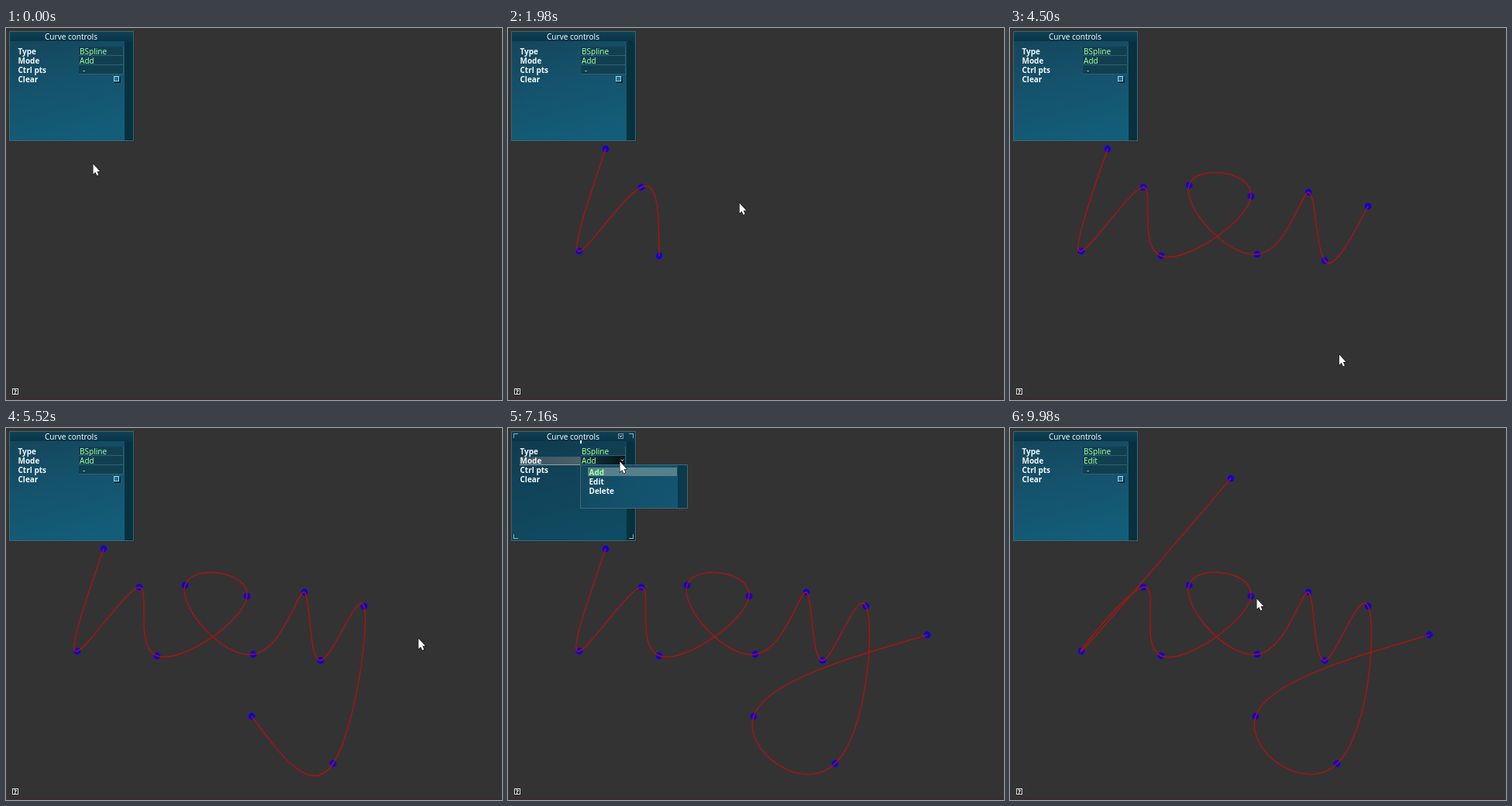
An HTML page with a canvas that plays this animation: 640x480 px, repeating every 10000 ms.

```html
<!DOCTYPE html>
<html lang="en">
<head>
<meta charset="utf-8">
<title>Curve controls</title>
<style>
html, body { margin: 0; width: 100%; height: 100%; overflow: hidden; background: #333; }
canvas { display: block; }
</style>
</head>
<body>
<canvas id="stage" width="640" height="480"></canvas>
<script>
const LOOP = 10000;
const MENU_OPEN = 7160, MENU_PICK = 7880, DRAG = 8940, DROP = 9300;
const SETTLE = 80, LINGER = 40; // pointer rest before and after a click
const ROW = 12;
const GREEN = '#a0ffa0';
const ctx = document.getElementById('stage').getContext('2d');

// Control points: x, y, click time
const points = [
  [126, 156, 300], [92, 288, 780], [172, 205.5, 1200], [195, 294, 1560],
  [311, 217, 2160], [231, 203, 2460], [319, 292, 2820], [385, 212, 3380],
  [406, 300, 3700], [462, 230, 4120], [422, 433, 4640], [317, 372, 5200],
  [541, 267, 5640]
];

// Pointer moves: start, end, x, y
const moves = points.map(([x, y, click], i) =>
  [i ? points[i - 1][2] + LINGER : 0, click - SETTLE, x, y]);
moves.push(
  [6080, 6920, 144, 43],      // to the mode field
  [MENU_OPEN, 7500, 122, 69], // down to "Edit"
  [7900, 8300, 138, 115],
  [8300, 8680, 126, 156],     // to the first point
  [DRAG, DROP, 285, 65],
  [9680, 9980, 318, 220]
);

function pointerAt(t) {
  let px = 112, py = 175;
  for (const [start, end, x, y] of moves) {
    const u = Math.min(1, Math.max(0, (t - start) / (end - start)));
    const ease = u * u * (3 - 2 * u);
    px += (x - px) * ease;
    py += (y - py) * ease;
  }
  return [px, py];
}

// Tangents of a natural cubic spline with uniform knots
function tangents(v) {
  const n = v.length - 1, b = [], d = [];
  for (let i = 0; i <= n; i++) {
    b[i] = i === 0 || i === n ? 2 : 4;
    d[i] = 3 * (v[Math.min(i + 1, n)] - v[Math.max(i - 1, 0)]);
    if (i) {
      d[i] -= d[i - 1] / b[i - 1];
      b[i] -= 1 / b[i - 1];
    }
  }
  for (let i = n; i >= 0; i--) d[i] = (d[i] - (i < n ? d[i + 1] : 0)) / b[i];
  return d;
}

function rect(x, y, w, h, fill) {
  ctx.fillStyle = fill;
  ctx.fillRect(x, y, w, h);
}

function frame(x, y, w, h, color) {
  ctx.strokeStyle = color;
  ctx.lineWidth = 1;
  ctx.strokeRect(x + .5, y + .5, w - 1, h - 1);
}

function text(s, x, y, color = '#f4f8f8', weight = 600) {
  ctx.font = `${weight} 10px "Noto Sans", "Open Sans", sans-serif`;
  ctx.fillStyle = color;
  ctx.fillText(s, x, y);
}

function gradient(x0, y0, x1, y1, ...colors) {
  const g = ctx.createLinearGradient(x0, y0, x1, y1);
  colors.forEach((c, i) => g.addColorStop(i / (colors.length - 1), c));
  return g;
}

function drawCurve(pts) {
  ctx.fillStyle = '#1400d4';
  for (const [x, y] of pts) {
    ctx.beginPath();
    ctx.arc(x, y, 4.4, 0, 7);
    ctx.fill();
  }
  if (pts.length < 2) return;
  const dx = tangents(pts.map(p => p[0])), dy = tangents(pts.map(p => p[1]));
  ctx.strokeStyle = '#a31414';
  ctx.lineWidth = 1.5;
  ctx.beginPath();
  ctx.moveTo(pts[0][0], pts[0][1]);
  for (let i = 1; i < pts.length; i++) {
    const [x0, y0] = pts[i - 1], [x1, y1] = pts[i];
    ctx.bezierCurveTo(x0 + dx[i - 1] / 3, y0 + dy[i - 1] / 3,
      x1 - dx[i] / 3, y1 - dy[i] / 3, x1, y1);
  }
  ctx.stroke();
}

function arrowButton(x, y, color) {
  frame(x, y, 7, 7, color);
  ctx.strokeStyle = '#e8f0f2';
  ctx.stroke(new Path2D(`M${x + 2} ${y + 2.5}l1.5 2l1.5 -2`));
}

function drawRow(label, value, y, active) {
  if (active) {
    rect(15, y + 1, 79, 11, gradient(15, 0, 94, 0, '#3a5360', '#4c6069'));
    rect(15, y + 11, 137, 1, '#8ea3ab');
  }
  text(label, 15.5, y + 9.5);
  if (value) {
    rect(94, y, 58, ROW, '#2a6172');
    rect(94, y, 57, ROW - 1, active ? gradient(94, 0, 152, 0, '#123a48', '#071015') : '#123f50');
    text(value, value === '-' ? 99 : 95, y + 9.5, GREEN, 500);
    if (active) arrowButton(144, y + 2, '#17262c');
  } else {
    rect(140, y + 3, 8, 8, '#082934');
    rect(139, y + 2, 7, 7, '#256f8c');
    frame(139, y + 2, 7, 7, '#8edcf0');
  }
}

function drawPanel(mode, hover, row, dimmed) {
  rect(5, 5, 161, 142, '#262c2f');
  rect(4, 4, 161, 142, gradient(45, 5, 85, 146, '#14465c', '#15536d', '#135d78'));
  if (dimmed) rect(4, 4, 161, 142, 'rgba(8, 34, 46, .3)');
  rect(5, 5, 159, 12, gradient(0, 5, 0, 17, '#0d4056', '#0b3447'));
  rect(153, 17, 11, 128, '#07313f');
  frame(4, 4, 161, 142, '#436673');
  text('Curve controls', 50, 15, undefined, 500);

  const values = ['BSpline', mode, '-'];
  ['Type', 'Mode', 'Ctrl pts', 'Clear'].forEach((label, i) =>
    drawRow(label, values[i], 24 + ROW * i, row === i));

  if (hover) {
    for (const x of [7, 161]) for (const y of [7, 142]) {
      rect(x === 7 ? x : x - 5, y, 6, 1, '#8fabb5');
      rect(x, y === 7 ? y : y - 5, 1, 6, '#8fabb5');
    }
    arrowButton(142, 7, '#7896a1');
    rect(93, 16, 2, 4, '#fff');
  }
}

function drawMenu(pointerY) {
  const pick = Math.max(0, Math.floor((pointerY - 51) / ROW));
  rect(93, 47, 139, 57, gradient(93, 47, 200, 104, '#14475c', '#13506a', '#145470'));
  rect(219, 48, 12, 55, '#0a3a4c');
  frame(93, 47, 139, 57, '#436673');
  rect(103, 51 + ROW * pick, 115, 11, '#57808b');
  ['Add', 'Edit', 'Delete'].forEach((s, i) =>
    text(s, 104.5, 60.5 + ROW * i, i === pick ? GREEN : undefined));
}

function drawPointer(x, y) {
  ctx.save();
  ctx.translate(x, y);
  const shape = new Path2D('M.5 .5V13.6L3.4 10.9L5.4 15.4L7.5 14.5L5.6 10H9.2Z');
  ctx.lineWidth = 1.2;
  ctx.strokeStyle = '#111';
  ctx.stroke(shape);
  ctx.fillStyle = '#fff';
  ctx.fill(shape);
  ctx.restore();
}

function drawHelp() {
  rect(8, 465, 8, 8, '#222');
  frame(8, 465, 8, 8, '#ddd');
  ctx.font = 'bold 7.5px "DejaVu Sans", sans-serif';
  ctx.fillStyle = '#fff';
  ctx.fillText('?', 9.8, 471.8);
}

function draw(t) {
  const [x, y] = pointerAt(t);
  const menu = t >= MENU_OPEN && t < MENU_PICK;
  const hover = t < DRAG && x < 165 && y < 146;
  const row = menu ? 1 : hover ? Math.floor((y - 24) / ROW) : -1;
  const pts = points.filter(p => t >= p[2]);
  if (t >= DRAG) pts[0] = pointerAt(Math.min(t, DROP));

  rect(0, 0, 640, 480, '#333');
  rect(0, 477, 640, 3, '#352f32');
  drawCurve(pts);
  drawPanel(t < MENU_PICK ? 'Add' : 'Edit', hover, row, menu);
  if (menu) drawMenu(y);
  drawHelp();
  drawPointer(x, y);
}

const start = performance.now();
function tick() {
  draw((performance.now() - start) % LOOP);
  requestAnimationFrame(tick);
}
tick();
</script>
</body>
</html>
```
